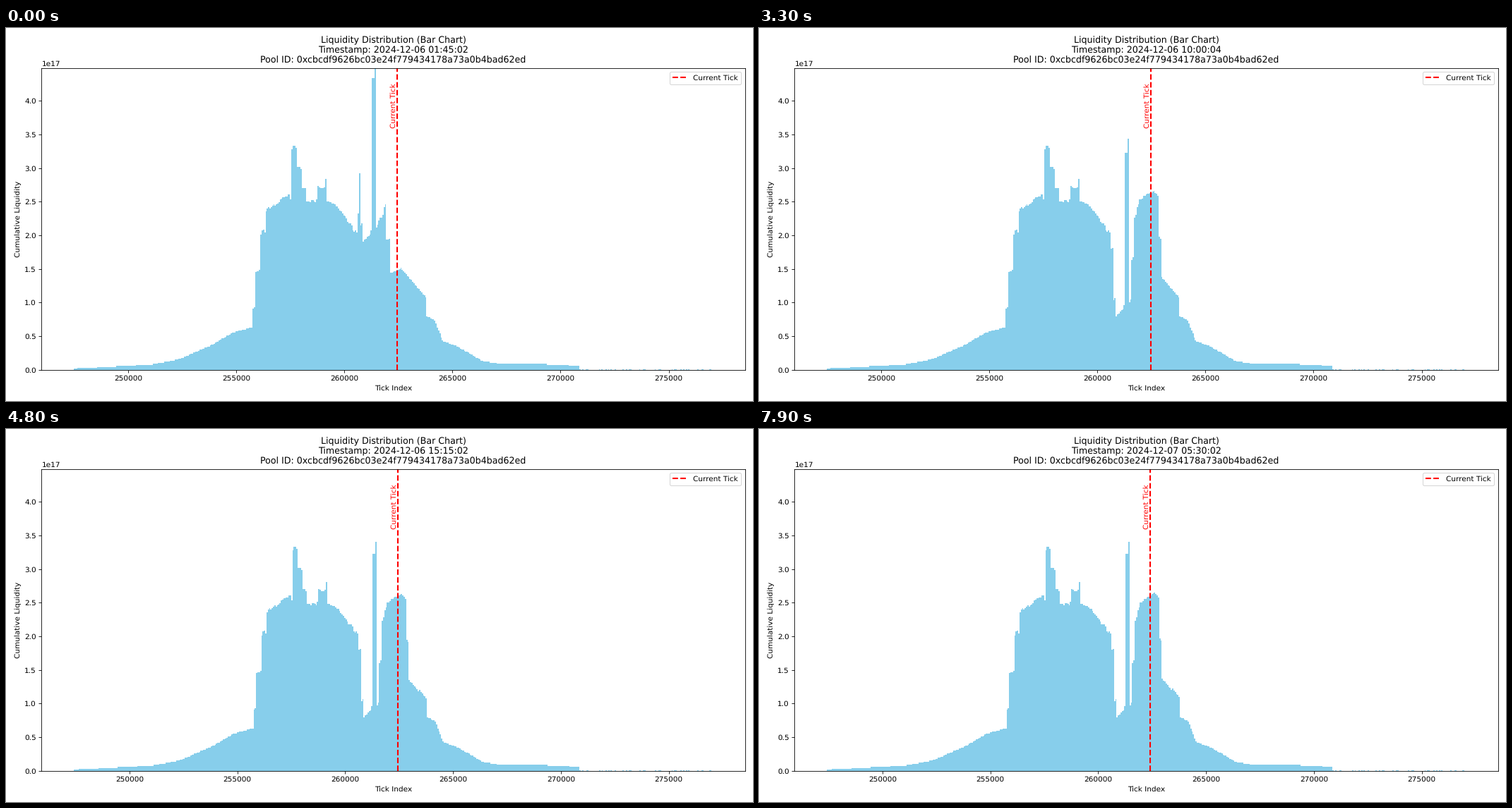
Write a matplotlib script that moves like this. It is 1058x529 px and loops after 8000 ms.

```python
import numpy as np
import matplotlib.pyplot as plt
from matplotlib.animation import FuncAnimation
from matplotlib.ticker import MultipleLocator

W, H = 1058, 529
FRAMES, INTERVAL = 80, 100
SPACING, ORIGIN = 60, 247500      # tick spacing, tick of bar 0
REACH = 15000                     # shown distance from the current tick
LAST, OUTER = 492, 500            # outermost bars holding liquidity
TAIL = 390                        # first bar of the sparse tail
Y_MAX = 4.49
POOL = "0xcbcdf9626bc03e24f779434178a73a0b4bad62ed"

# Smooth base of the profile: (bar, height in 1e17)
HILL = [(0, .02), (60, .08), (80, .15), (105, .36), (122, .55), (138, .64),
        (148, .72), (160, .93), (200, .84), (212, .55), (218, .38),
        (223, .57), (233, .79), (241, 1.13), (252, 1.23), (271, .80),
        (278, .74), (284, .43), (296, .34), (315, .13), (328, .09),
        (356, .09), (TAIL, .06)]

# Positions stacked on it: (first bar, end bar, height)
WALLS = [(138, 272, .28), (140, 244, .52), (144, 241, .54), (148, 223, .30)]
SPIKES = [(168, 172, .76), (172, 176, .48), (176, 179, .20), (188, 195, .20),
          (194, 195, .12), (219, 220, .27), (220, 221, .83),
          (230, 233, 2.24), (232, 233, .20)]

# Positions opened or closed later: (frame, first bar, end bar, height)
MOVES = [(21, 219, 235, -.52), (21, 220, 237, -.59), (21, 241, 256, .60),
         (21, 244, 258, .55), (38, 232, 266, -.03), (48, 178, 212, -.025),
         (75, 250, 272, .02)]

# Current tick and quarter hours since midnight over the frames
TICKS = [(0, 262450), (9, 262560), (14, 262650), (18, 262615), (27, 262610),
         (33, 262479), (38, 262510), (42, 262450), (54, 262420),
         (57, 262450), (60, 262420)]
QUARTERS = [(0, 7), (33, 40), (42, 52), (54, 70), (63, 94), (79, 118)]

bars = np.arange(-1, OUTER + 1)


def track(points, x):
    return np.interp(x, *zip(*points))


def block(first, end, height):
    return np.where((bars >= first) & (bars < end), height, 0)


def base_profile():
    rng = np.random.default_rng(4)
    h = track(HILL, bars) + sum(block(*p) for p in WALLS + SPIKES)
    noise = np.repeat(rng.normal(0, .02, bars.size // 2 + 1), 2)[:bars.size]
    h = np.round((h + noise * (h > 2)) / .015) * .015
    sparse = np.where(rng.random(bars.size) < .3, .01, 0)
    return np.where(bars < TAIL, h, sparse)


BASE = base_profile()


def liquidity(i):
    return BASE + sum(block(*p) for start, *p in MOVES if i >= start)


def title(i):
    day, minute = divmod(round(track(QUARTERS, i)) * 15, 1440)
    sec = {3: 1, 13: 4}.get(i % 20, 2)
    stamp = f"2024-12-{6 + day:02d} {minute // 60:02d}:{minute % 60:02d}:{sec:02d}"
    return f"Liquidity Distribution (Bar Chart)\nTimestamp: {stamp}\nPool ID: {POOL}"


plt.rcParams.update({"font.family": "DejaVu Sans", "text.hinting": "no_hinting"})
fig = plt.figure(figsize=(14, 7), dpi=W / 14)
ax = fig.add_axes([50.4 / W, 44.2 / H, 996.2 / W, 428.2 / H])

edges = ORIGIN + SPACING * (np.arange(-1, OUTER + 2) - .5)
area = ax.stairs(BASE * 1e17, edges, fill=True, color="skyblue", zorder=1)
line = ax.axvline(TICKS[0][1], color="red", linestyle="--", linewidth=2,
                  label="Current Tick")
tag = ax.text(TICKS[0][1], .95 * Y_MAX * 1e17, "Current Tick", color="red",
              rotation=90, ha="right", va="top")
head = ax.set_title(title(0), fontsize=12, y=1.0)
ax.set_xlabel("Tick Index")
ax.set_ylabel("Cumulative Liquidity")
ax.set_ylim(0, Y_MAX * 1e17)
ax.xaxis.set_major_locator(MultipleLocator(5000))
ax.yaxis.set_major_locator(MultipleLocator(.5e17))
ax.legend(loc="upper right")


def draw(i):
    tick = round(track(TICKS, i))
    first = int(np.ceil((tick - REACH - ORIGIN) / SPACING))
    last = OUTER if tick + REACH >= ORIGIN + OUTER * SPACING else LAST
    shown = (bars >= first) & (bars <= last)
    area.set_data(values=np.where(shown, liquidity(i), 0) * 1e17)

    left = ORIGIN + SPACING * (first - .5)
    right = ORIGIN + SPACING * (last + .5)
    margin = .05 * (right - left)
    ax.set_xlim(left - margin, right + margin)

    line.set_xdata([tick, tick])
    tag.set_x(tick)
    head.set_text(title(i))
    return area, line, tag, head


anim = FuncAnimation(fig, draw, frames=FRAMES, interval=INTERVAL,
                     init_func=lambda: draw(0), repeat=True, repeat_delay=0)
plt.show()
```
